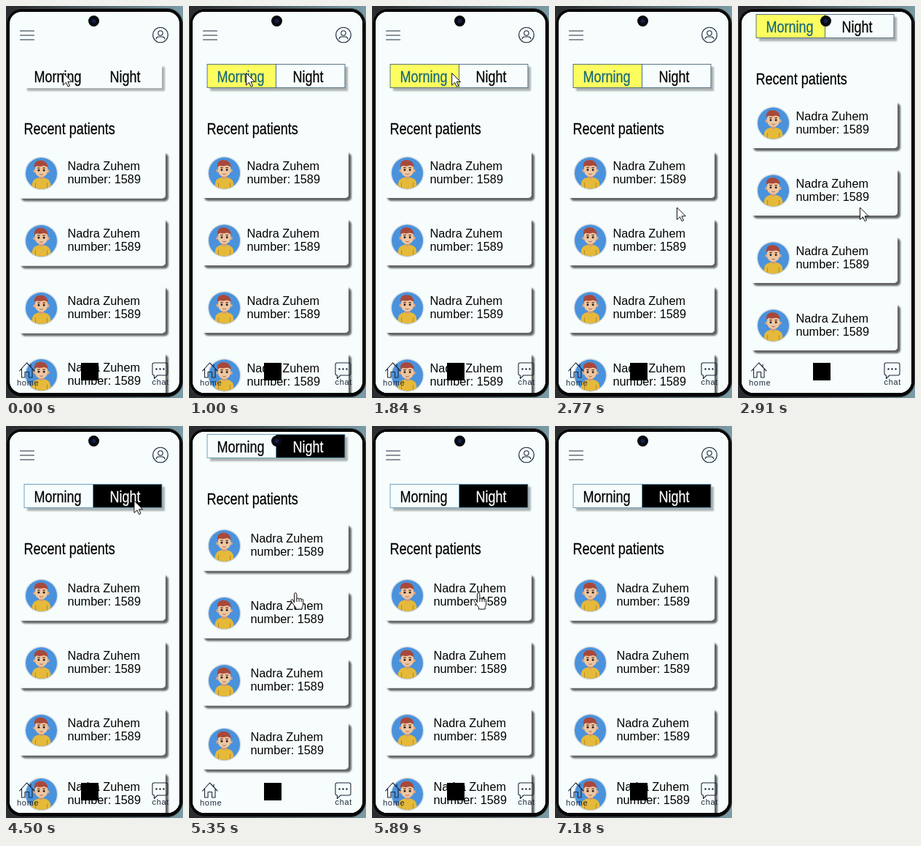
These frames come from a looping animation (243 by 535 pixels, 7.2 s). An HTML page:

```html
<!DOCTYPE html>
<html lang="en">
<head>
<meta charset="utf-8">
<title>Patient list</title>
<style>
  html, body { margin: 0; width: 100%; height: 100%; overflow: hidden; }
  svg { display: block; width: 243px; height: 535px; font-family: "Liberation Sans", Arial, sans-serif; }
  .head { font-size: 22px; }
  .card text { font-size: 16.3px; }
  .nav text { font-size: 11px; letter-spacing: .7px; fill: #1d2a3a; }
  .line { fill: none; stroke: #1d2a3a; stroke-width: 1.1; stroke-linejoin: round; stroke-linecap: round; }
  .cursor { fill: #fff; stroke: #111; stroke-linejoin: round; }
</style>
</head>
<body>
<svg viewBox="0 0 243 535">
  <defs>
    <clipPath id="screen"><rect x="5" y="8" width="233" height="520" rx="16"/></clipPath>
    <clipPath id="disc"><circle r="21.5"/></clipPath>
    <linearGradient id="desk">
      <stop offset=".1" stop-color="#2b2e30"/><stop offset="1" stop-color="#7b9ca6"/>
    </linearGradient>
    <filter id="deep" x="-10%" y="-20%" width="120%" height="150%">
      <feDropShadow dx="4" dy="4" stdDeviation="1.2" flood-opacity=".6"/>
    </filter>
    <filter id="soft" x="-10%" y="-20%" width="120%" height="150%">
      <feDropShadow dx="4" dy="4" stdDeviation="1" flood-opacity=".3"/>
    </filter>
    <g id="avatar">
      <circle r="23" fill="#d9dfe4"/>
      <circle r="21.5" fill="#4a92dc"/>
      <g clip-path="url(#disc)">
        <path d="M-13 18Q-13 7 -4 6H4Q13 7 13 18V22H-13Z" fill="#e5b93a"/>
        <path d="M-8 13V22M8 13V22" stroke="#b98a25" fill="none"/>
        <g transform="translate(0 -1.5) scale(.9)">
          <path d="M-4 3H4V9Q0 12 -4 9Z" fill="#d49d74"/>
          <circle cx="-10" cy="-2" r="2.5" fill="#dba680"/>
          <circle cx="10" cy="-2" r="2.5" fill="#dba680"/>
          <path d="M-9.5 -8Q0 -15 9.5 -8V-1Q8 7 0 7T-9.5 -1Z" fill="#eec6a0"/>
          <path d="M-10.5 -7Q-12 -17 -3 -18Q9 -19 10.5 -7Q7 -10 4 -10Q-4 -8 -7 -10Z" fill="#a9483a"/>
          <path d="M-6 -6.5H-2M2 -6.5H6" stroke="#6b3525" stroke-width="1.2"/>
          <circle cx="-4" cy="-3" r="1.6" fill="#2b2120"/>
          <circle cx="4" cy="-3" r="1.6" fill="#2b2120"/>
          <path d="M-2.5 3Q0 4.5 2.5 3" stroke="#a4553d" fill="none"/>
        </g>
      </g>
    </g>
  </defs>

  <rect width="243" height="535" fill="url(#desk)"/>
  <rect x=".5" y="3.5" width="242" height="530" rx="21" fill="#050607" stroke="#3c3f41"/>
  <g clip-path="url(#screen)">
    <g id="pages"></g>
    <g class="nav">
      <path class="line" d="M18.5 498L28.5 487L39 498M21.5 495V507H26V499.5H31.5V507H36V495M34 489V492"/>
      <text x="15" y="517.5">home</text>
      <rect x="103" y="487" width="24" height="24"/>
      <path class="line" d="M203.5 487H219.5Q222 487 222 489.5V501.5Q222 504 219.5 504H208L203.5 508.5V504Q201 504 201 501.5V489.5Q201 487 203.5 487Z"/>
      <path class="line" style="stroke-width:2.4" d="M206.5 495.5h.1M211.5 495.5h.1M216.5 495.5h.1"/>
      <text x="200.5" y="516.5">chat</text>
    </g>
  </g>
  <circle cx="120.5" cy="20.5" r="7.5" fill="#07090d"/>
  <circle cx="120.5" cy="20.5" r="3" fill="#14204a"/>
  <path class="cursor" id="arrow" d="M0 0V16.5L4 12.8L6.6 18.6L9 17.5L6.5 11.8H11.8Z"/>
  <g id="hand">
    <path class="cursor" transform="translate(-7 -1)" d="M5.5 14V2.6q0-1.8 1.7-1.8t1.7 1.8V9.5q.2-1.5 1.6-1.5t1.6 1.6q.3-1.2 1.6-1.2t1.5 1.6q.3-.8 1.3-.8 1.2 0 1.2 1.6V16q0 2.5-1.5 4.5V23H7.6V20.5Q5 18 3.4 15L1.2 11.8q-.6-1.4.6-2 1.2-.5 2.3.9ZM8.9 9.5V13M12.1 9.6V13M15.2 10V13"/>
  </g>
</svg>
<script>
const LOOP = 7200, SCROLL = 68, PITCH = 92, TICK = 125;
const PAPER = '#f7fdfd';
const $ = id => document.getElementById(id);

// Condensed heading face
const narrow = (x, y, text, fill = '#000') =>
  `<text class="head" fill="${fill}" stroke="${fill}" stroke-width=".25"
    transform="translate(${x} ${y}) scale(.82 1)">${text}</text>`;

const header = `<g class="line">
  <path d="M19.5 34H38.5M19.5 40H38.5M19.5 46H38.5"/>
  <circle cx="212" cy="39.5" r="10.3"/><circle cx="212" cy="37" r="3.2"/>
  <path d="M206 45Q206.5 42 209.5 42H214.5Q217.5 42 218 45"/></g>`;

const half = (x, fill, stroke) =>
  `<rect x="${x}" y="79.5" width="94.5" height="32" fill="${fill}" stroke="${stroke}" stroke-width=".9"/>`;

const toggle = ({ left, right, edge, ink = '#000', night = '#000' }) =>
  `<rect x="25" y="79" width="189" height="33" fill="${PAPER}" filter="url(#soft)"/>` +
  half(25, left, edge) + half(119.5, right, edge) +
  narrow(38.5, 104, 'Morning', ink) + narrow(142.5, 104, 'Night', night);

const card = (y, x) => `<g class="card" transform="translate(0 ${y})">
  <rect x="17" width="202" height="65" rx="5" fill="${PAPER}" filter="url(#deep)"/>
  <use href="#avatar" x="48.5" y="31"/>
  <text x="${x}" y="26.5">Nadra Zuhem</text><text x="${x}" y="44.5">number: 1589</text></g>`;

// lift: how far the last card sits above the regular pitch
const looks = [
  { top: 197.5, x: 84.5, lift: 1, left: PAPER, right: PAPER, edge: 'none' },
  { top: 197, x: 79.5, lift: 0, left: '#fdfd60', right: PAPER, edge: '#47697a', ink: '#17687a' },
  { top: 200.5, x: 84.5, lift: 5, left: PAPER, right: '#000', edge: '#5d9bb5', night: '#fff' }
];

const page = look => {
  const cards = [0, 1, 2, 3].map(i => card(look.top + i * PITCH - (i === 3 ? look.lift : 0), look.x));
  return `<g><rect width="243" height="610" fill="${PAPER}"/>${header}${toggle(look)}
    ${narrow(24.5, 174.5, 'Recent patients')}${cards.join('')}</g>`;
};
$('pages').innerHTML = looks.map(page).join('');
const pages = [...$('pages').children];

// Pointer legs: start, ticks taken, goal, and when the hand turns back into an arrow
const legs = [
  { at: 0, ticks: 1, x: 78.5, y: 91.5, hand: 0 },
  { at: 1720, ticks: 3, x: 172, y: 92, hand: 2770 },
  { at: 2630, ticks: 1, x: 167.5, y: 275, hand: 2770 },
  { at: 3720, ticks: 3, x: 176, y: 102, hand: 4500 },
  { at: 4920, ticks: 2, x: 146, y: 228, hand: 6450 },
  { at: 6450, ticks: 3, x: 208, y: 667, hand: 0 }
];

const within = (t, a, b) => t >= a && t < b;

function pointer(t) {
  const i = legs.findLastIndex(leg => leg.at <= t);
  const to = legs[i], from = legs[i - 1] || to;
  const p = Math.min(1, (Math.floor((t - to.at) / TICK) + 1) / to.ticks);
  return {
    x: from.x + (to.x - from.x) * p,
    y: from.y + (to.y - from.y) * p,
    kind: p === 1 && t < to.hand ? 'hand' : 'arrow'
  };
}

function draw() {
  const t = performance.now() % LOOP;
  const scroll = within(t, 2910, 3600) || within(t, 5350, 5890) ? SCROLL : 0;
  const shown = [1, within(t, 880, 1000) ? .5 : +(t >= 1000), +(t >= 4500)];
  pages.forEach((el, i) => {
    el.setAttribute('opacity', shown[i]);
    el.setAttribute('transform', `translate(0 ${-scroll})`);
  });
  const { x, y, kind } = pointer(t);
  for (const id of ['arrow', 'hand']) {
    $(id).style.display = id === kind ? '' : 'none';
    $(id).setAttribute('transform', `translate(${x} ${y})`);
  }
  requestAnimationFrame(draw);
}
draw();
</script>
</body>
</html>
```
